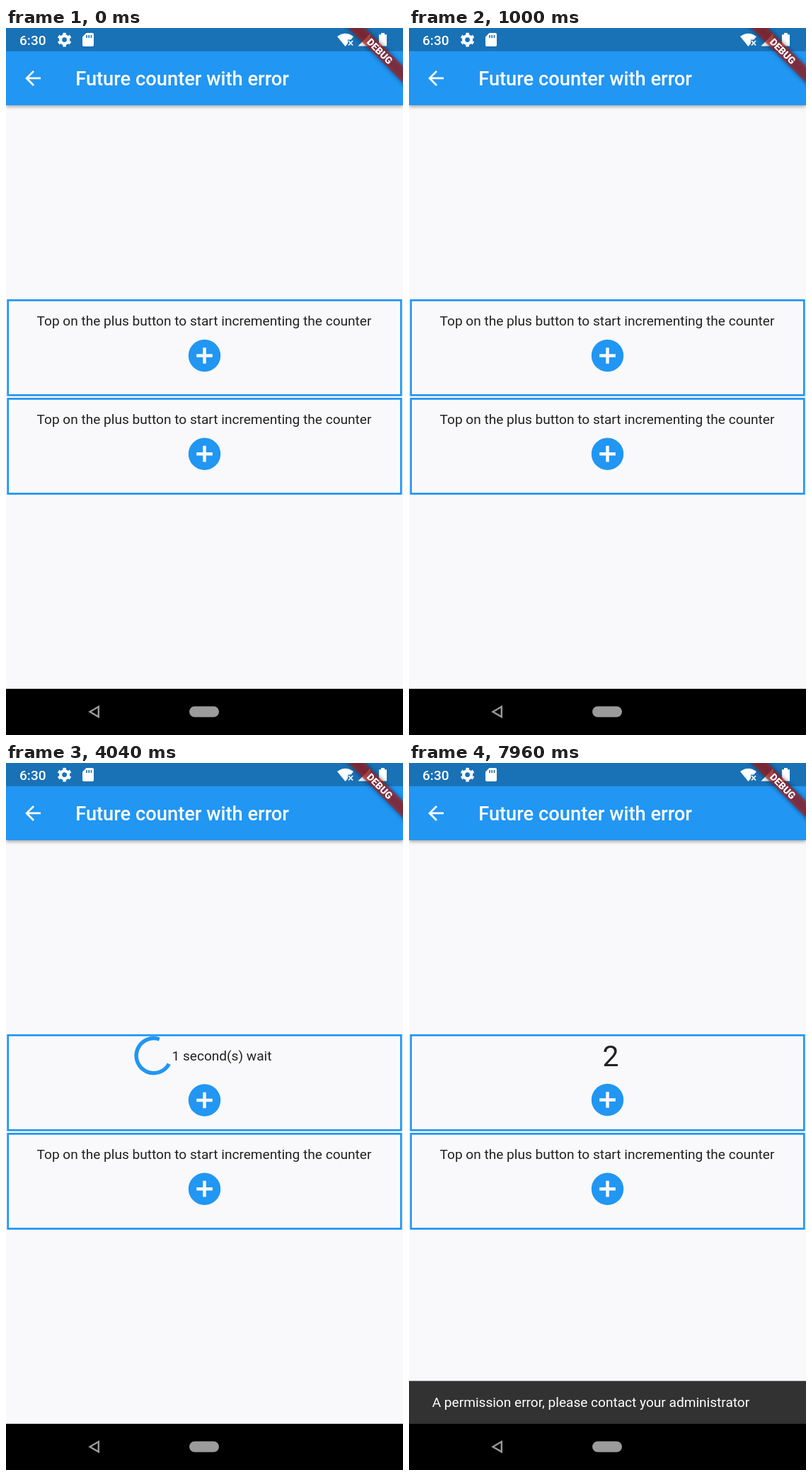
These frames come from a looping animation (561x998 px, 8 s). An HTML page:

```html
<!DOCTYPE html>
<html lang="en">
<head>
<meta charset="utf-8">
<title>Future counter with error</title>
<style>
  html, body { margin: 0; width: 100%; height: 100%; overflow: hidden; background: #000; }
  svg { display: block; width: 100vw; height: 100vh; font: 19.09px Roboto, sans-serif; }
  .bar { fill: #2196f3; filter: drop-shadow(0 2px 2.5px rgba(0, 0, 0, .35)); }
  .title { font-size: 27.27px; font-weight: 500; fill: #fff; }
  .clock { font-weight: 500; fill: #fff; }
  .card { fill: none; stroke: #2196f3; stroke-width: 2.73; }
  .body { fill: #212121; text-anchor: middle; }
  .error { fill: #f44336; }
  .number { font-size: 40.9px; fill: #212121; }
  .ribbon text { font-size: 13.9px; font-weight: 900; fill: #fff; text-anchor: middle; }
  .shade { filter: blur(3px); }
</style>
</head>
<body>
<svg viewBox="0 0 561 998" preserveAspectRatio="none">
  <defs>
    <path id="plus" fill="#2196f3" d="M0-10a10 10 0 1 0 0 20a10 10 0 1 0 0-20zm5 11h-4v4h-2v-4h-4v-2h4v-4h2v4h4z"/>
  </defs>
  <rect width="561" height="998" fill="#f9f9fb"/>
  <rect class="bar" width="561" height="109"/>
  <rect width="561" height="32.7" fill="#1971b6"/>

  <path transform="translate(21.7 54.6) scale(1.364)" fill="#fff" d="M20 11H7.83l5.59-5.59L12 4l-8 8 8 8 1.41-1.41L7.83 13H20z"/>
  <text class="title" x="98.2" y="81.2">Future counter with error</text>

  <!-- status icons -->
  <text class="clock" x="19" y="23.6">6:30</text>
  <g fill="none" stroke="#fff" transform="translate(82.6 16.6)">
    <circle r="5.5" stroke-width="4.2"/>
    <circle r="8.2" stroke-width="3.4" pathLength="12" stroke-dasharray="1 1" stroke-dashoffset="1.5"/>
  </g>
  <path fill="#fff" d="M113.5 7H122q2 0 2 2v15q0 2-2 2h-12q-2 0-2-2V12.5z"/>
  <path stroke="#1971b6" stroke-width="1.6" d="M114 10v4m3.2-4v4m3.2-4v4"/>
  <path fill="#fff" d="M468 12q11.5-8.5 23 0l-3.600 4.400h-4.400v5.400l-3.500 4.200z"/>
  <path stroke="#fff" stroke-width="1.8" d="M484 18l6 6.500m0-6.500l-6 6.500"/>
  <path fill="#fff" d="M497.500 25.500h17V8z"/>
  <path fill="#fff" d="M527 9.200h3V7h5v2.200h3V25.500h-11z"/>

  <!-- cards -->
  <rect class="card" x="2.7" y="384.3" width="555.6" height="134"/>
  <rect class="card" x="2.7" y="523.4" width="555.6" height="134"/>
  <path id="spinner" fill="none" stroke="#2196f3" stroke-width="5.46"/>
  <text id="idle" class="body" x="280" y="419.7">Top on the plus button to start incrementing the counter</text>
  <text id="wait" x="234.500" y="419.7" fill="#212121">1 second(s) wait</text>
  <text id="error" class="body error" x="280" y="419.7">A permission error, please contact your administrator</text>
  <text id="number" class="number" x="273.500" y="427.500"></text>
  <use id="button" href="#plus"/>
  <text class="body" x="280" y="558.9">Top on the plus button to start incrementing the counter</text>
  <use href="#plus" transform="translate(280.5 601.2) scale(2.273)"/>

  <g id="snack">
    <rect width="561" height="62" fill="#323232"/>
    <text id="snackText" x="32.700" y="36.800" fill="#fff">A permission error, please contact your administrator</text>
  </g>

  <!-- navigation bar -->
  <rect y="932.800" width="561" height="66"/>
  <path fill="none" stroke="#999" stroke-width="2.4" d="M118.500 965.200l12.300-7.200v14.400z"/>
  <rect x="259" y="957.500" width="42" height="15.200" rx="7.600" fill="#9b9b9b"/>

  <g class="ribbon" transform="translate(561 0) rotate(45)">
    <rect class="shade" x="-80" y="38.200" width="160" height="16.400" opacity=".5"/>
    <rect x="-80" y="38.200" width="160" height="16.400" fill="#b71c1c" opacity=".627"/>
    <text y="51.300">DEBUG</text>
  </g>
</svg>
<script>
  const LOOP = 8000, WAIT = 1476, SNACK_IN = 369;
  const ERROR_AT = 4947;
  const phases = [
    { at: 0, view: 'idle' },
    { at: 1124, view: 'wait' },
    { at: 2600, view: 'number', value: 1 },
    { at: 3471, view: 'wait' },
    { at: ERROR_AT, view: 'error' },
    { at: 5818, view: 'wait' },
    { at: 7294, view: 'number', value: 2 }
  ];
  const buttonY = { idle: 462.5, error: 462.5, wait: 476, number: 475.5 };
  const views = ['idle', 'wait', 'error', 'number'];
  const $ = id => document.getElementById(id);
  const clamp = x => Math.min(1, Math.max(0, x));
  const show = (id, on) => { $(id).style.display = on ? '' : 'none'; };

  // cubic-bezier(.4, 0, .2, 1)
  function ease(x) {
    x = clamp(x);
    let lo = 0, hi = 1;
    for (let i = 0; i < 24; i++) {
      const s = (lo + hi) / 2, r = 1 - s;
      if (1.2 * s * r * r + 0.6 * s * s * r + s ** 3 < x) lo = s; else hi = s;
    }
    return lo * lo * (3 - 2 * lo);
  }

  function arcPath(p) {
    const cx = 208.7, cy = 413.2, r = 24.55;
    const head = ease(p * 2), tail = ease(p * 2 - 1);
    const start = Math.PI * (-0.5 + 1.5 * tail + 1.7 * p);
    const sweep = Math.max(1.5 * Math.PI * (head - tail), 0.001);
    const point = a => `${cx + r * Math.cos(a)} ${cy + r * Math.sin(a)}`;
    return `M${point(start)}A${r} ${r} 0 ${+(sweep > Math.PI)} 1 ${point(start + sweep)}`;
  }

  function draw(t) {
    const phase = phases.filter(p => p.at <= t).pop();
    views.forEach(v => show(v, v === phase.view));
    const waiting = phase.view === 'wait';
    show('spinner', waiting);
    if (waiting) $('spinner').setAttribute('d', arcPath(clamp((t - phase.at) / WAIT)));
    $('number').textContent = phase.value || '';
    $('button').setAttribute('transform', `translate(280.5 ${buttonY[phase.view]}) scale(2.273)`);

    const p = clamp((t - ERROR_AT) / SNACK_IN);
    show('snack', p > 0);
    $('snack').setAttribute('transform', `translate(0 ${932.8 - 60.5 * ease(p)})`);
    $('snackText').setAttribute('opacity', ease((p - 0.45) / 0.55));
  }

  const begin = performance.now();
  function tick() {
    draw((performance.now() - begin) % LOOP);
    requestAnimationFrame(tick);
  }
  tick();
</script>
</body>
</html>
```
